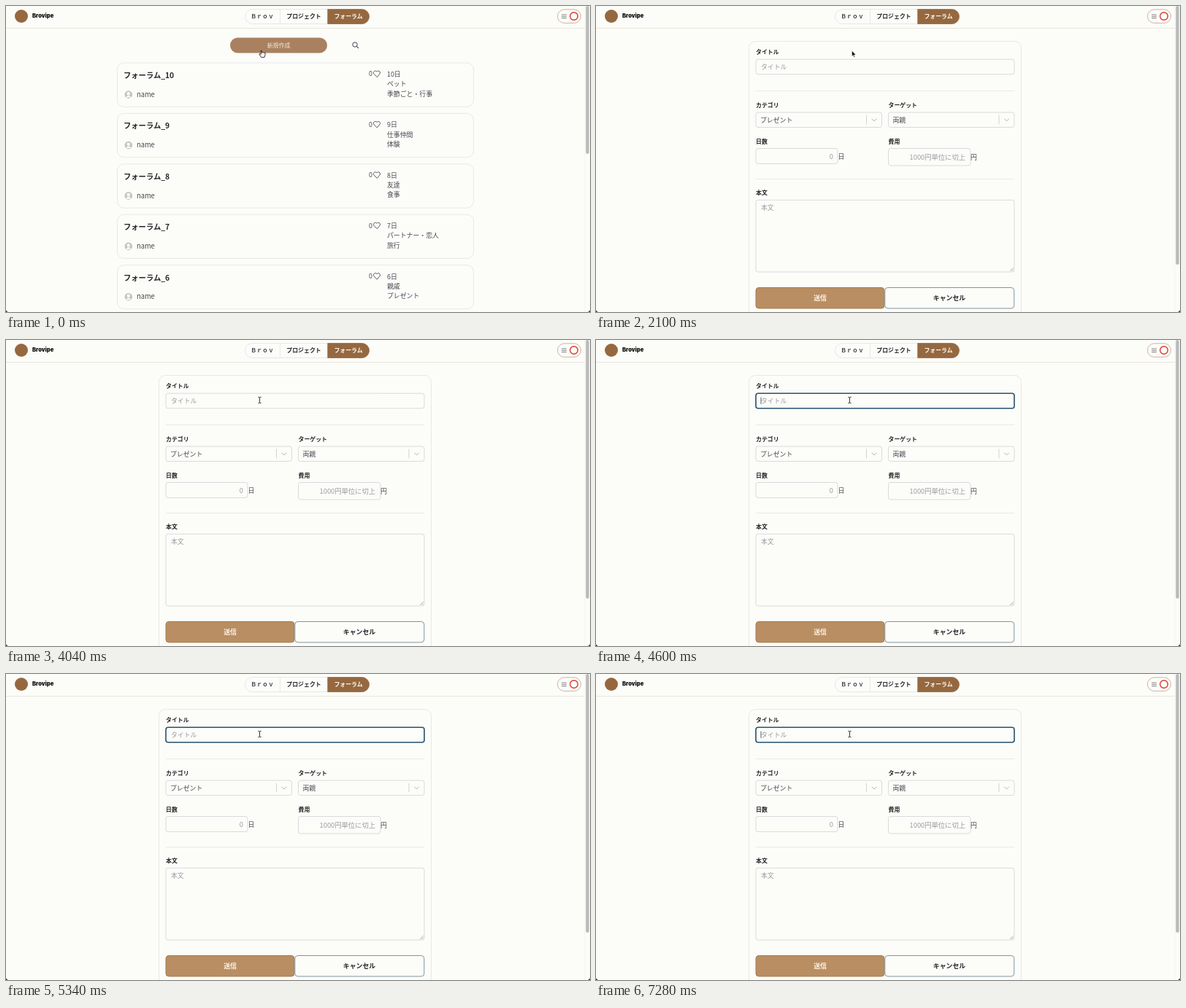
Recreate the animation shown at these times as an HTML page. Size 800 by 420 pixels, loop 8000 ms.

```html
<!DOCTYPE html>
<html lang="ja">
<head>
<meta charset="utf-8">
<style>
html, body { margin: 0; width: 100%; height: 100%; overflow: hidden; background: #fcfcf9; }
svg { display: block; width: 800px; height: 420px; }
text { font-family: "Noto Sans CJK JP", "Noto Sans CJK", sans-serif; white-space: pre; }
</style>
</head>
<body>
<svg id="stage" viewBox="0 0 800 420"></svg>
<script>
const LOOP = 8000;
const PAPER = '#fcfcf9', INK = '#45464f', DARK = '#26262b', HINT = '#9b9ba0';
const LINE = '#e8e8ec', EDGE = '#dadade', BROWN = '#966840';

const rect = (x, y, w, h, r, fill, stroke = 'none', sw = 1) =>
  `<rect x="${x}" y="${y}" width="${w}" height="${h}" rx="${r}" fill="${fill}" stroke="${stroke}" stroke-width="${sw}"/>`;
const path = (d, stroke, sw = 1, fill = 'none') =>
  `<path d="${d}" stroke="${stroke}" stroke-width="${sw}" fill="${fill}" stroke-linecap="round" stroke-linejoin="round"/>`;
const circle = (x, y, r, fill, stroke = 'none', sw = 1) =>
  `<circle cx="${x}" cy="${y}" r="${r}" fill="${fill}" stroke="${stroke}" stroke-width="${sw}"/>`;
// y is the vertical middle of the line
const text = (s, x, y, size, { fill = INK, weight = 400, anchor = 'start', extra = '' } = {}) =>
  `<text x="${x}" y="${y + size * 0.37}" font-size="${size}" font-weight="${weight}" fill="${fill}" text-anchor="${anchor}" ${extra}>${s}</text>`;
const group = (id, body) => `<g id="${id}">${body}</g>`;

function header() {
  const tab = (s, x, fill = DARK) => text(s, x, 14.5, 7.9, { fill, weight: 700, anchor: 'middle' });
  return path('M0 30.5H793', '#ebe7da')
    + circle(21, 14, 9, BROWN)
    + text('Brovipe', 36, 13.3, 7.6, { fill: '#111', weight: 900, extra: 'style="font-family:Inter,sans-serif"' })
    + rect(327.5, 4.5, 170, 20, 10, PAPER, LINE)
    + path('M441 4.5H487.5a10 10 0 0 1 0 20H441Z', BROWN, 0.8, BROWN)
    + path('M375.5 5V24', LINE)
    + tab('Ｂｒｏｖ', 351, INK) + tab('プロジェクト', 408) + tab('フォーラム', 469, '#fff8ee')
    + rect(755.5, 4.8, 32, 18.6, 9.3, PAPER, '#cfb49e')
    + path('M761.5 12H767.5M761.5 14.3H767.5M761.5 16.6H767.5', '#77777c', 0.9)
    + circle(778, 14, 5.3, 'none', '#d8362a', 1.4);
}

function card(n, y, kinds) {
  return rect(152.5, y, 488, 60.3, 9, 'none', LINE)
    + text(`フォーラム_${n}`, 161, y + 17.2, 10.3, { fill: DARK, weight: 700 })
    + circle(167.8, y + 43.6, 5.3, '#c9c2c0')
    + circle(167.8, y + 42.2, 2.2, PAPER)
    + path(`M165 ${y + 47.6}q2.8-4.4 5.6 0`, PAPER, 1.2, PAPER)
    + text('name', 179, y + 43.4, 9.3)
    + text('0', 497, y + 15.2, 8.8)
    + path(`M508 ${y + 19.3}l-3.9-4c-2.3-2.6 1.6-6 3.9-3.1c2.3-2.9 6.2.5 3.9 3.1Z`, INK, 0.9)
    + [`${n}日`, ...kinds].map((s, i) => text(s, 522, y + 15.7 + i * 13.3, 8.9)).join('');
}

function list() {
  const kinds = [['ペット', '季節ごと・行事'], ['仕事仲間', '体験'], ['友達', '食事'],
    ['パートナー・恋人', '旅行'], ['親戚', 'プレゼント']];
  return rect(307, 43.5, 133, 21, 10.5, '#a98160')
    + text('新規作成', 373.5, 54, 7.9, { fill: '#f6e8d8', anchor: 'middle' })
    + circle(478, 53, 3.2, 'none', INK) + path('M480.4 55.4L482.7 57.7', INK, 1.1)
    + kinds.map((k, i) => card(10 - i, 78 + i * 69.4, k)).join('');
}

function form() {
  const label = (s, x, y) => text(s, x, y, 7.9, { fill: DARK, weight: 700 });
  const field = (x, y, w, h) => rect(x, y, w, h, 3, PAPER, EDGE);
  const select = (s, x) => field(x, 146, 172.5, 20.5) + text(s, x + 6, 156.3, 8.9)
    + path(`M${x + 151.5} 150V162`, '#cfcfd2', 0.9)
    + path(`M${x + 159} 155l3 3l3-3`, '#b4b4b8', 1);
  const hint = (s, x, y, size = 8.9, anchor = 'start') => text(s, x, y, size, { fill: HINT, anchor });
  const action = (s, x, fill) => text(s, x, 400.7, 8.9, { fill, weight: 700, anchor: 'middle' });
  return rect(209.5, 48.5, 373, 400, 9, 'none', LINE)
    + label('タイトル', 219, 63) + field(219, 73.2, 354, 20.6) + hint('タイトル', 226, 83.5)
    + path('M219 116.5H573M219 237.5H573', LINE, 0.9)
    + label('カテゴリ', 219, 135.6) + label('ターゲット', 400.5, 135.6)
    + select('プレゼント', 219) + select('両親', 400.5)
    + label('日数', 219, 186) + label('費用', 400.5, 186)
    + field(219, 195.5, 112, 21) + hint('0', 325, 206.3, 9.3, 'end') + text('日', 331.5, 206.3, 8.9)
    + field(400.5, 195.5, 112.5, 23.5) + hint('1000円単位に切上', 506, 207.5, 9.3, 'end') + text('円', 513, 207.5, 8.9)
    + label('本文', 219, 256.3) + field(219, 266.3, 354, 98.7) + hint('本文', 226, 276.8)
    + path('M567.5 363.5l4-4M570 363.5l1.5-1.5', '#8d8d90', 0.7)
    + rect(219, 386.5, 176, 28.5, 4, '#b98e62', '#a87c50')
    + rect(395.8, 386.5, 177, 28.5, 4, PAPER, '#7f959e')
    + action('送信', 307, '#fff6ea') + action('キャンセル', 484, DARK);
}

const hand = path('M-1.2-4v5l-1.6-1.1q-1.4.3-.5 1.5l2.5 3.5h4.3l1-3.3v-2.7q-1-.9-1.7 0q-.8-1.1-1.7-.3q-.7-.8-1.3-.1v-2.5q-.5-.9-1 0Z', '#222', 0.9, '#fff');
const arrow = path('M0-4v7.6l1.8-1.6l1.2 2.8l1.2-.5l-1.2-2.7h2.4Z', '#fff', 0.5, '#111');
const beam = path('M-1.7-4.2q1.7 0 1.7 1q0-1 1.7-1M0-3.2V3.2M-1.7 4.2q1.7 0 1.7-1q0 1 1.7 1', '#222', 0.9);

const stage = document.getElementById('stage');
stage.innerHTML = rect(0, 0, 800, 420, 0, PAPER)
  + group('list', list()) + group('form', form())
  + group('focus', rect(219, 73.2, 354, 20.6, 3, 'none', '#2a556e', 1.6))
  + group('caret', path('M226 79V87.5', '#333', 0.8))
  + header()
  + path('M793 0V420', '#efefec', 0.7)
  + '<rect id="thumb" x="794.3" y="0" width="4.4" rx="2.2" fill="#bababa"/>'
  + path('M0 420v-3q.4 2.6 3 3ZM800 420v-3q-.4 2.6-3 3Z', 'none', 0, '#222')
  + group('cursor', group('hand', hand) + group('arrow', arrow) + group('beam', beam));

const $ = id => document.getElementById(id);
const show = (id, on) => $(id).setAttribute('visibility', on ? 'visible' : 'hidden');

function draw(t) {
  const onForm = t >= 1960;
  const p = Math.min(1, Math.max(0, (t - 3620) / 300));
  const glide = p * p * (3 - 2 * p);
  const y = 65.5 + 17 * glide;
  const overField = y > 75;
  show('list', !onForm);
  show('form', onForm);
  show('focus', t >= 4460);
  show('caret', (t >= 4460 && t < 5300) || t >= 7280);
  show('hand', !onForm);
  show('arrow', onForm && !overField);
  show('beam', overField);
  $('thumb').setAttribute('height', onForm ? 355 : 203);
  $('cursor').setAttribute('transform', `translate(${350.5 - 3 * glide} ${y})`);
}

const start = performance.now();
function tick() {
  draw((performance.now() - start) % LOOP);
  requestAnimationFrame(tick);
}
tick();
</script>
</body>
</html>
```
